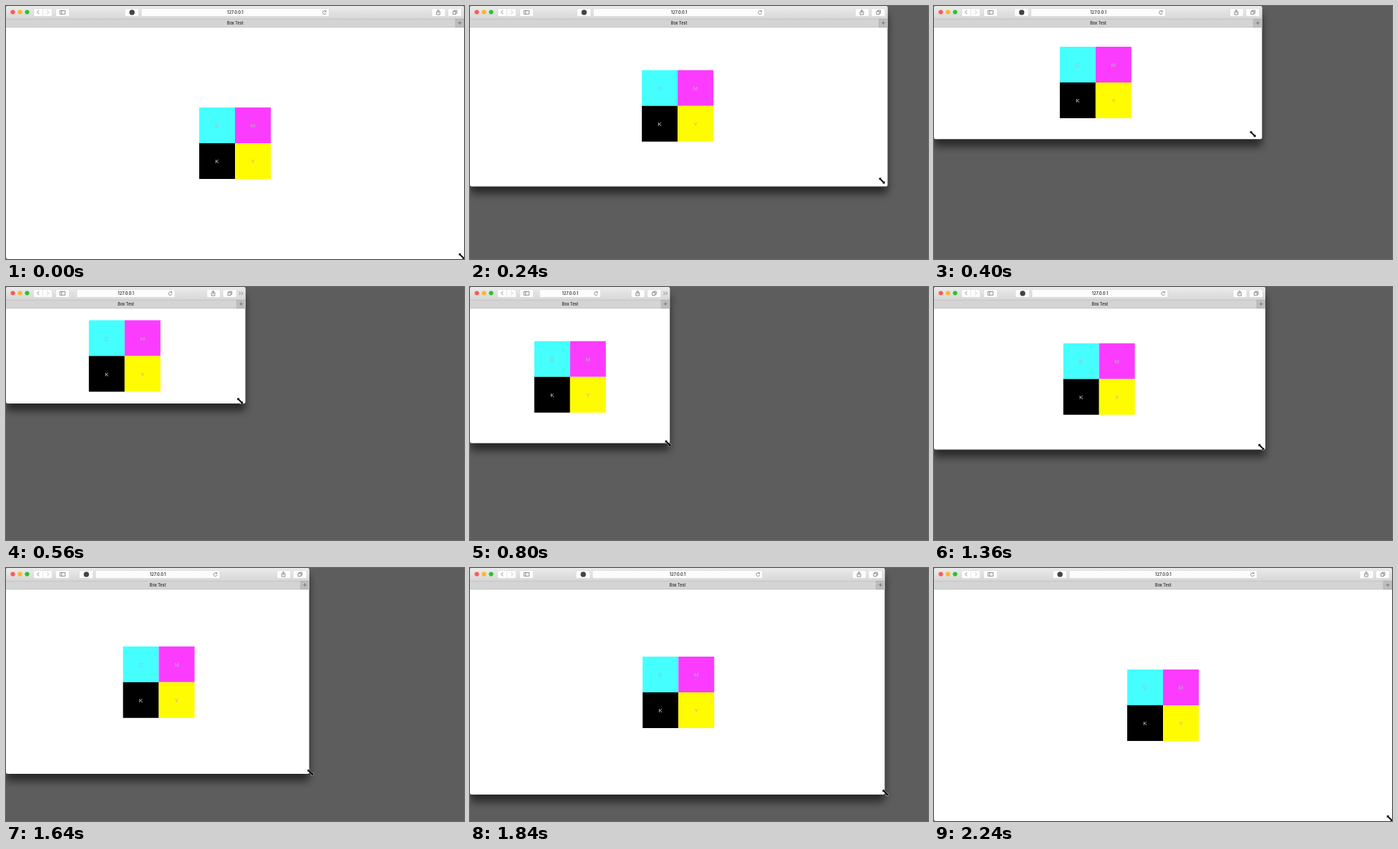
Write an HTML page that moves like this. It is 640 px wide and 354 px high and loops after 2920 ms.

```html
<!DOCTYPE html>
<html lang="en">
<head>
<meta charset="utf-8">
<title>Box Test</title>
<style>
  html, body { margin: 0; width: 100%; height: 100%; overflow: hidden; background: #5d5d5d; }
  svg { display: block; width: 640px; height: 354px; }
  text { text-anchor: middle; font-family: Inter, Roboto, sans-serif; fill: #1c1c1c; }
  .letter { font: 8px "Liberation Sans", Arial, sans-serif; fill: #b2b2b2; }
  .button { fill: #fcfcfc; stroke: #d0d0d0; stroke-width: .5; }
  .icon { fill: none; stroke: #6a6a6a; stroke-width: .75; }
</style>
</head>
<body>
<svg viewBox="0 0 640 354">
  <defs>
    <linearGradient id="bar" x2="0" y2="1">
      <stop stop-color="#ebebeb"/><stop offset="1" stop-color="#d7d7d7"/>
    </linearGradient>
    <filter id="blur" filterUnits="userSpaceOnUse" x="-40" y="-40" width="760" height="460">
      <feGaussianBlur stdDeviation="6"/>
    </filter>
    <clipPath id="frame"><rect class="sized" rx="2.5"/></clipPath>
  </defs>

  <rect width="640" height="354" fill="#5d5d5d"/>
  <g filter="url(#blur)"><rect class="sized" y="10" rx="3" opacity=".58"/></g>

  <g clip-path="url(#frame)">
    <rect width="640" height="354" fill="#fff"/>
    <rect width="640" height="18" fill="url(#bar)"/>
    <rect y="18" width="640" height="12" fill="#d4d4d4"/>
    <path d="M0 18.25H640M0 29.75H640" stroke="#b2b2b2" stroke-width=".5"/>

    <circle cx="9.5" cy="8.5" r="3.1" fill="#fc5b57"/>
    <circle cx="19.5" cy="8.5" r="3.1" fill="#f5b82f"/>
    <circle cx="29.5" cy="8.5" r="3.1" fill="#2fc032"/>
    <rect class="button" x="38.5" y="3.5" width="26" height="11" rx="1.5"/>
    <path d="M51.5 3.5v11" stroke="#d8d8d8" stroke-width=".5"/>
    <path class="icon" d="M46 6.2l-2.3 2.6L46 11.4"/>
    <path class="icon" d="M57.3 6.2l2.3 2.6-2.3 2.6" opacity=".45"/>
    <rect class="button" x="69.5" y="3.5" width="19" height="11" rx="1.5"/>
    <path class="icon" d="M75.3 6.5h7.4v4.8h-7.4zM77.8 6.5v4.8"/>

    <g id="badge">
      <rect class="button" x="-23" y="3.5" width="19.5" height="11" rx="1.5"/>
      <circle cx="-13" cy="8.9" r="3.7" fill="#444"/>
    </g>
    <rect id="field" class="button" y="3.5" height="11" rx="1.5"/>
    <g id="reload" class="icon">
      <path d="M1.9 -1.4A2.4 2.4 0 1 0 2.4 .5M2.1 -3v1.8H.4"/>
    </g>
    <g id="middle">
      <text y="11" font-size="5.8" font-weight="500">127.0.0.1</text>
      <text y="26" font-size="5.5" font-weight="500">Box Test</text>
    </g>

    <g id="tools">
      <rect class="button" x="-45" y="3.5" width="19" height="11" rx="1.5"/>
      <path class="icon" d="M-36.7 7.8h-1.6v4.3h4.6V7.8h-1.6M-36 10V5.3M-37.5 6.7l1.5-1.5 1.5 1.5"/>
      <rect class="button" x="-22.5" y="3.5" width="19" height="11" rx="1.5"/>
      <path class="icon" d="M-15.5 7.6h4v4h-4zM-14 7.4V6.1h4.1v4h-1.4"/>
    </g>
    <g id="edge">
      <rect x="-12" y="18" width="12" height="12" fill="#bdbdbd"/>
      <path d="M-12 18v12M-12 18.25H0M-12 29.75H0" stroke="#a2a2a2" stroke-width=".5"/>
      <path class="icon" d="M-8.5 23.7h5M-6 21.2v5"/>
      <path id="more" class="icon" d="M-9 6.6l2.2 2.3L-9 11.2M-5.7 6.6l2.2 2.3-2.2 2.3"/>
    </g>

    <g id="boxes">
      <path d="M-50 -50H0V0H-50z" fill="#45ffff"/>
      <path d="M0 -50H50V0H0z" fill="#fb3cff"/>
      <path d="M-50 0H0V50H-50z"/>
      <path d="M0 0H50V50H0z" fill="#fffb00"/>
      <text class="letter" x="-25" y="-22">C</text>
      <text class="letter" x="25" y="-22">M</text>
      <text class="letter" x="-25" y="28" style="fill:#d4d4d4">K</text>
      <text class="letter" x="25" y="28">Y</text>
    </g>
  </g>

  <path id="cursor" d="M-4 -4H-.6L-1.6 -3 3 1.6 4 .6V4H.6L1.6 3 -3 -1.6 -4 -.6z"
        stroke="#fff" stroke-width=".7" paint-order="stroke"/>
</svg>
<script>
const LOOP = 2920, STEP = 40;
const WIDTH = [[50, 640], [240, 583.5], [560, 334.5], [760, 278], [900, 290], [1040, 352.5],
  [1160, 450], [1240, 480], [1360, 463], [1520, 405], [1620, 417], [1720, 478],
  [1840, 579.5], [2000, 626], [2240, 640]];
const HEIGHT = [[50, 354], [240, 252.5], [480, 168], [560, 163], [760, 205], [920, 262],
  [1040, 277], [1160, 262], [1360, 227.5], [1520, 250], [1640, 288], [1720, 299],
  [1840, 317], [2240, 354]];

const $ = id => document.getElementById(id);
const sized = document.querySelectorAll('.sized');
const move = (id, x, y = 0) => $(id).setAttribute('transform', `translate(${x} ${y})`);

const secant = (a, b) => (b[1] - a[1]) / (b[0] - a[0]);

// Harmonic-mean tangents keep the curve from overshooting its points.
function tangent(keys, i) {
  if (i === 0 || i === keys.length - 1) return 0;
  const a = secant(keys[i - 1], keys[i]), b = secant(keys[i], keys[i + 1]);
  return a * b > 0 ? 2 * a * b / (a + b) : 0;
}

function sample(keys, t) {
  const last = keys.length - 1;
  if (t <= keys[0][0]) return keys[0][1];
  if (t >= keys[last][0]) return keys[last][1];
  const i = keys.findIndex(k => k[0] > t) - 1;
  const [t0, v0] = keys[i], [t1, v1] = keys[i + 1];
  const d = t1 - t0, u = (t - t0) / d, s = u * u * (3 - 2 * u);
  return v0 + (v1 - v0) * s
    + d * u * (1 - u) * ((1 - u) * tangent(keys, i) - u * tangent(keys, i + 1));
}

function draw(time) {
  const t = Math.floor(time % LOOP / STEP) * STEP;
  const size = lead => [sample(WIDTH, t + lead), sample(HEIGHT, t + lead)];
  const [w, h] = size(0);
  for (const el of sized) {
    el.setAttribute('width', w);
    el.setAttribute('height', h);
  }

  const narrow = w < 344;
  const fieldWidth = Math.min(.41 * w, w - (narrow ? 194 : 236));
  const left = (w - fieldWidth) / 2 + .3;
  $('field').setAttribute('x', left);
  $('field').setAttribute('width', fieldWidth);
  move('badge', left);
  $('badge').style.display = narrow ? 'none' : '';
  $('more').style.display = narrow ? '' : 'none';
  move('reload', left + fieldWidth - 6.5, 9);
  move('middle', w / 2 + .3);
  move('tools', narrow ? w - 9 : w);
  move('edge', w);

  // The page layout and the pointer run slightly ahead of the window edge.
  const [pageW, pageH] = size(7);
  move('boxes', pageW / 2, (pageH + 30) / 2);
  const [dragX, dragY] = size(10);
  move('cursor', dragX - 3.2, dragY - 3.8);
}

const start = performance.now();
function tick() {
  draw(performance.now() - start);
  requestAnimationFrame(tick);
}
tick();
</script>
</body>
</html>
```
